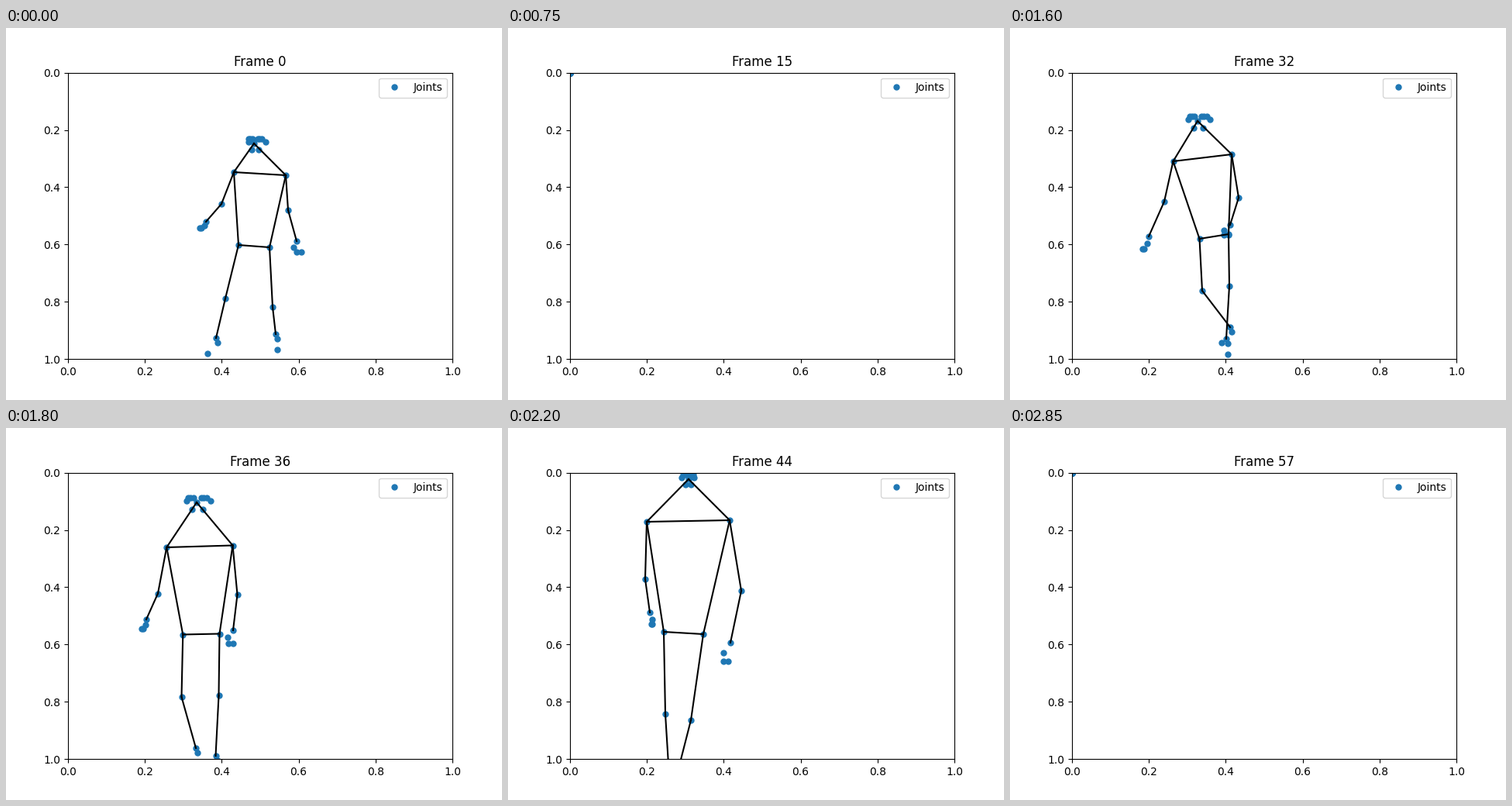
Write a matplotlib script that moves like this. It is 640x480 px and loops after 2.9 s.

```python
import numpy as np
import matplotlib.pyplot as plt
from matplotlib.animation import FuncAnimation

FRAMES, STEP = 58, 50
VISIBLE = [(0, 12), (29, 48)]   # tracked spans; all joints sit at 0,0 otherwise

# Joint order: nose, then left and right of shoulder, elbow, wrist, hip, knee, ankle
BONES = [(0, 1), (0, 2), (1, 2), (7, 8)]
for s in (1, 2):
    chains = (s, s + 2, s + 4), (s, s + 6, s + 8, s + 10)
    BONES += [pair for c in chains for pair in zip(c, c[1:])]


def face(nose, width, turn):
    """Eyes, ear and mouth corner on each side of the nose."""
    pts = []
    for side in (-1, 1):
        pts += [(side * width * k + 0.3 * turn, -6.5) for k in (0.33, 0.56, 0.78)]
        pts += [(side * width + turn, -2.5),
                (side * width * 0.42 + 0.4 * turn, 4 + width / 3)]
    return nose + np.array(pts)


def hand(elbow, wrist, spread):
    """Three fingertips that carry on along the forearm."""
    reach = np.outer([0.36, 0.36, 0.2], wrist - elbow)
    return wrist + reach + np.outer([-4, 2, -6], [spread, 0])


def foot(ankle, side):
    return ankle + np.array([(2, 6), (6.5 * side - 4.5, 20)])


def pose(head, *body):
    """All joints in axes units, from key joints in stage pixels."""
    b = np.array(body, float)
    pts = np.vstack([b, face(b[0], *head),
                     hand(b[3], b[5], -0.3), hand(b[4], b[6], 1),
                     foot(b[11], -1), foot(b[12], 1)])
    return (pts - [80, 57.6]) / [496, 369.6]


KEYS = {
    0: pose((11, 4), (320, 149), (294, 186), (361, 190), (278, 227), (364, 235),
            (258, 250), (375, 275), (300, 280), (340, 283), (283, 349),
            (344, 360), (271, 400), (348, 395)),
    7: pose((12, 6), (267, 150), (248, 190), (317, 184), (239, 237), (332, 230),
            (222, 270), (336, 247), (265, 283), (308, 283), (257, 351),
            (305, 354), (259, 400), (299, 383)),
    32: pose((14, 2), (242, 120), (210.5, 172), (286, 163), (199, 224), (295, 219),
             (179, 269), (284, 254), (244.5, 272), (282, 266), (248, 339),
             (283, 333), (284, 386), (279, 401)),
    40: pose((17, 3), (250, 72), (204, 136), (299, 140), (193, 203), (302, 211),
             (183, 225), (302, 268), (212, 261), (269, 265), (205, 355),
             (266, 358), (206, 440), (262, 445)),
    44: pose((8, -1), (233, 66), (179, 121), (286, 119), (177, 195), (301, 210),
             (183, 238), (287, 277), (201, 263), (252, 266), (203, 369),
             (236, 377), (208, 450), (213, 467)),
}
TIMES = sorted(KEYS)


def joints(n):
    if not any(a <= n <= b for a, b in VISIBLE):
        return np.zeros_like(KEYS[0])
    i = min(np.searchsorted(TIMES, n, side="right"), len(TIMES) - 1)
    a, b = TIMES[i - 1], TIMES[i]
    return KEYS[a] + (KEYS[b] - KEYS[a]) * (n - a) / (b - a)


fig, ax = plt.subplots(figsize=(6.4, 4.8), dpi=100)
ax.set(xlim=(0, 1), ylim=(1, 0))
dots, = ax.plot([], [], "o", color="#1f77b4", markersize=5, label="Joints")
bones = [ax.plot([], [], "k-")[0] for _ in BONES]
ax.legend(loc="upper right")
title = ax.set_title("Frame 0")


def update(n):
    pts = joints(n)
    dots.set_data(*pts.T)
    for line, pair in zip(bones, BONES):
        line.set_data(*pts[list(pair)].T)
    title.set_text(f"Frame {n}")
    return [dots, *bones, title]


anim = FuncAnimation(fig, update, frames=FRAMES, interval=STEP,
                     repeat=True, repeat_delay=0)
plt.show()
```
